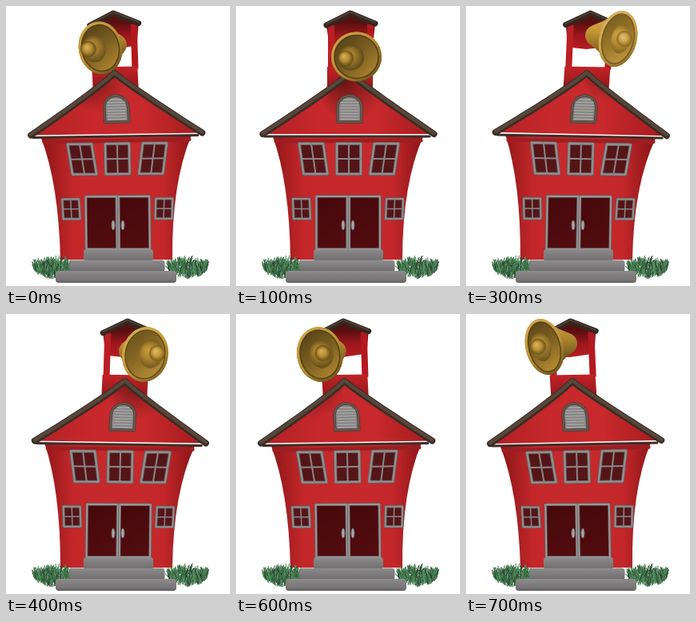
These frames come from a looping animation (280 px wide and 350 px high, 800 ms). An HTML page with a canvas:

```html
<!DOCTYPE html>
<html lang="en">
<head>
<meta charset="utf-8">
<title>Swaying schoolhouse</title>
<style>
html, body { margin: 0; width: 100%; height: 100%; overflow: hidden; background: #fff; }
canvas { display: block; }
</style>
</head>
<body>
<canvas id="stage" width="280" height="350"></canvas>
<script>
const g = document.getElementById('stage').getContext('2d');
g.lineJoin = g.lineCap = 'round';
let sway = 0;

// The upper house leans further than the lower; the base stays put.
function bend([x, y]) {
  const lean = y > 160 ? 3.3 * Math.max(0, (315 - y) / 155) ** 1.5
    : y > 85 ? 3.3 + (160 - y) * .076
    : 9 + (85 - y) * .044;
  const tilt = .02 * Math.min(1, Math.max(0, (300 - y) / 135));
  return [x + sway * lean, y + sway * tilt * (x - 140)];
}

function paint(fill, line, width) {
  if (fill) { g.fillStyle = fill; g.fill(); }
  if (line) { g.strokeStyle = line; g.lineWidth = width; g.stroke(); }
}

function shape(pts, fill, line, width, open) {
  g.beginPath();
  pts.forEach(p => g.lineTo(...bend(p)));
  if (!open) g.closePath();
  paint(fill, line, width);
}

const box = (x, y, w, h, lean = 0) =>
  [[x, y], [x + w, y], [x + w + lean, y + h], [x + lean, y + h]];
const stroke = (pts, color, width) => shape(pts, null, color, width, true);

function oval(x, y, rx, ry, turn, fill, line, width) {
  g.beginPath();
  g.ellipse(x, y, rx, ry, turn, 0, 7);
  paint(fill, line, width);
}

function fillStops(grad, colors) {
  colors.forEach((c, i) => grad.addColorStop(i / (colors.length - 1), c));
  return grad;
}

const ramp = (x0, y0, x1, y1, ...colors) =>
  fillStops(g.createLinearGradient(x0, y0, x1, y1), colors);
const glow = (x, y, r, ...colors) =>
  fillStops(g.createRadialGradient(x - r * .25, y - r * .3, 0, x, y, r), colors);

function pane(x, y, w, h, lean, line) {
  const frame = box(x, y, w, h, lean);
  shape(frame, '#551518', '#5f5a5a', line + 1);
  shape(frame, null, '#918e8e', line - .5);
  stroke([[x + w / 2, y], [x + w / 2 + lean, y + h]], '#898686', line - 1);
  stroke([[x + lean / 2, y + h / 2], [x + w + lean / 2, y + h / 2]], '#898686', line - 1);
}

function tower() {
  const roof = [[113, 24], [143, 9], [174, 22]];
  shape([...roof, [171, 50], [140, 54], [117, 52]], ramp(0, 20, 0, 54, '#56100f', '#9c161c', '#b81d23'));
  shape(box(115, 24, 8, 56), '#bb1e24');
  shape(box(164, 23, 8, 56), '#b4181f');
  shape(box(114, 76, 57, 30), ramp(0, 76, 0, 106, '#c22227', '#8e161a'));
  stroke(roof, '#332720', 7);
  stroke(roof.map(([x, y]) => [x, y - 1.5]), '#4f3f36', 2);
}

function walls() {
  const curve = (c, p) => g.quadraticCurveTo(...bend(c), ...bend(p));
  g.beginPath();
  g.moveTo(...bend([46, 163]));
  curve([67, 222], [68, 317]);
  g.lineTo(208, 317);
  curve([208, 222], [234, 163]);
  g.closePath();
  paint(ramp(46, 0, 234, 0, '#8f1719', '#c3272a', '#c6292c', '#c6292c', '#c3272a', '#8a1517'));
  stroke([[50, 169], [231, 168]], '#9f1d20', 5);
}

function roof(light) {
  const edge = [];
  for (let i = -12; i <= 12; i++) {
    const t = i / 12;
    edge.push([140.5 + 107 * t + 1.5 * (1 - t * t), 84 + 76 * Math.abs(t) ** .93]);
  }
  shape(edge, ramp(40, 0, 240, 0, '#b32226', '#c6282b', '#c7292c', '#a81c20'));
  shape(edge, glow(light.x - 8, light.y + 40, 40, 'rgba(50,10,5,.65)', 'rgba(50,10,5,0)'));
  stroke([[36, 163], [242, 163]], '#3f2d27', 3);
  stroke(edge, '#392c24', 8);
  stroke(edge.map(([x, y]) => [x, y - 1]), '#57463a', 4.5);
}

function vent() {
  const arch = [[127, 145]];
  for (let a = 0; a <= 12; a++) {
    const turn = Math.PI * (1 + a / 12);
    arch.push([142 + 15 * Math.cos(turn), 127 + 15 * Math.sin(turn)]);
  }
  arch.push([157, 145]);
  shape(arch, '#858282', '#4f4038', 3.5);
  shape(arch, null, '#6b5d54', 1.5);
  for (let y = 117; y < 144; y += 3.5) {
    const w = Math.min(11, 2 + (y - 113) * 1.2);
    stroke([[142 - w, y], [142 + w, y]], '#a9a7a7', 1.5);
  }
}

function openings() {
  for (const k of [-1, 0, 1]) pane(126 + 47 * k, 172, 30, 38, -5.5 * k, 3);
  for (const k of [-1, 1]) pane(129.5 + 58.5 * k, 241, 21, 25, -k, 2.5);
  for (const x of [100.5, 141.5]) {
    const door = box(x, 238, 38.5, 66);
    shape(door, ramp(x, 238, x + 38, 304, '#46090c', '#540c10'), '#625e5e', 3.5);
    shape(door, null, '#9a9797', 2);
  }
  for (const x of [134, 146]) oval(x, 274, 2, 6, 0, '#aaa8a8', '#6d6a6a', 1);
}

function grass() {
  let seed = 7;
  const rnd = () => (seed = seed * 16807 % 2147483647) / 2147483647;
  for (const left of [35, 203]) {
    for (let i = 0; i < 420; i++) {
      const u = rnd(), x = left + u * 48;
      const y = 328 + (rnd() - .35) * 20 * Math.sin(Math.PI * u) ** .5;
      g.beginPath();
      g.moveTo(x, y);
      g.lineTo(x + rnd() * 8 - 4, y - 3 - rnd() * 7);
      paint(null, `hsl(${122 + rnd() * 22},${20 + rnd() * 16}%,${18 + rnd() * 32}%)`, 1);
    }
  }
}

function steps() {
  for (let i = 0; i < 3; i++) {
    const y = 304 + 13.5 * i;
    g.beginPath();
    g.roundRect(97 - 17.5 * i, y, 87 + 32 * i, 15, 4);
    paint(ramp(0, y, 0, y + 15, '#8f8d8d', '#858383', '#7d7b7b', '#777575', '#605e5e'));
  }
}

// The bell swings with the house; its clapper trails behind.
function pose(phase) {
  const s = Math.cos(phase), v = -Math.sin(phase), s2 = s * s;
  const x = 144 + 46 * s + 6.5 * v - 4 * s * v, y = 62 - 21 * s2 + 1.4 * v;
  return {
    x, y, rx: 32.5 - 9 * s2 - v, ry: 32 + 3.5 * s2 - v, turn: .25 * s,
    cx: x - 28 * s, cy: y - 4,
    kx: x + 8 * s - 13.5 * v, ky: y + 2 * v,
    light: 38 + 5 * s2 + 3 * s
  };
}

function bell({ x, y, rx, ry, turn, cx, cy, kx, ky, light }) {
  const gold = d => `hsl(41,58%,${light + d}%)`;
  const shell = ramp(x, y - ry, x, y + ry, gold(14), gold(4), gold(-12), gold(-22));
  const crown = 13;
  for (let i = 0; i <= 20; i++) {
    const u = i / 20, v = .7 * u + .3 * u ** 4;
    oval(cx + (x - cx) * u, cy + (y - cy) * u,
      crown + (rx - crown) * v, crown + (ry - crown) * v, turn * u, shell);
  }
  const across = [x - rx, y - ry, x + rx, y + ry];
  oval(x, y, rx, ry, turn, ramp(...across, gold(18), gold(8), gold(-16)));
  oval(x, y, rx - 4, ry - 4, turn, ramp(...across, gold(-20), gold(-8), gold(10)), gold(-18), 1.5);
  const dx = (x + kx) / 2, dy = (y + ky) / 2, r = ry * .52;
  oval(dx, dy, rx * .52, r, turn, glow(dx, dy, r, gold(8), gold(0), gold(-14)));
  oval(kx, ky, 10, 10, 0, glow(kx, ky, 10, gold(24), gold(8), gold(-14)));
}

function draw(now) {
  const phase = (Math.floor(now / 100) - 3) * Math.PI / 4;
  const swing = pose(phase);
  sway = Math.cos(phase);
  g.fillStyle = '#fff';
  g.fillRect(0, 0, 280, 350);
  tower();
  walls();
  roof(swing);
  vent();
  openings();
  grass();
  steps();
  bell(swing);
  requestAnimationFrame(draw);
}
requestAnimationFrame(draw);
</script>
</body>
</html>
```
